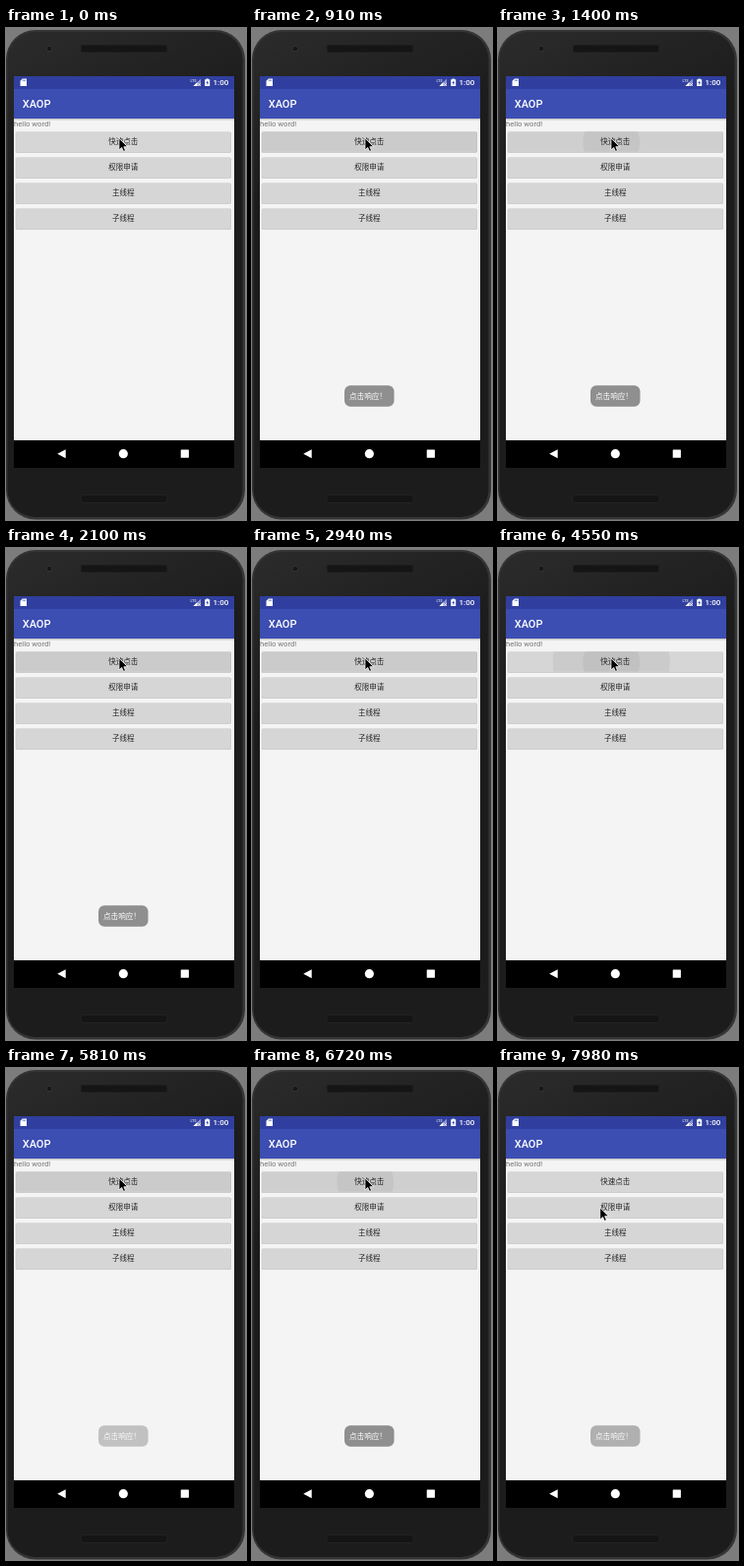
These frames come from a looping animation (244 by 500 pixels, 8 s). An HTML page:

```html
<!DOCTYPE html>
<html lang="zh-CN">
<head>
<meta charset="utf-8">
<title>XAOP</title>
<style>
  html, body { margin: 0; width: 100%; height: 100%; overflow: hidden; background: #7c7c7c; }
  svg { display: block; width: 244px; height: 500px; }
  text { font-family: Roboto, "Noto Sans CJK SC", "Noto Sans CJK", sans-serif; }
  .label { font-size: 7.5px; fill: #222; text-anchor: middle; font-family: "Noto Sans CJK SC", "Noto Sans CJK", sans-serif; }
</style>
</head>
<body>
<svg viewBox="0 0 244 500">
  <defs>
    <linearGradient id="shade" x2="0" y2="1">
      <stop offset="0" stop-color="#000" stop-opacity=".22"/>
      <stop offset="1" stop-color="#000" stop-opacity="0"/>
    </linearGradient>
    <linearGradient id="body" gradientUnits="userSpaceOnUse" x1="0" y1="0" x2="70" y2="150">
      <stop offset="0" stop-color="#2c2c2c"/>
      <stop offset="1" stop-color="#1c1c1c"/>
    </linearGradient>
    <radialGradient id="spot">
      <stop offset="0" stop-color="#999" stop-opacity=".35"/>
      <stop offset="1" stop-color="#aaa" stop-opacity=".15"/>
    </radialGradient>
    <clipPath id="key"><rect x="10" y="105" width="219" height="20.8" rx="1.2"/></clipPath>
  </defs>

  <!-- phone -->
  <rect x="0" y="2" width="243" height="497.5" rx="30" fill="#343434"/>
  <rect x="1.5" y="4" width="239" height="493" rx="28" fill="url(#body)"/>
  <g fill="#151515" stroke="#262626" stroke-width=".8">
    <rect x="76" y="17" width="88" height="8" rx="2"/>
    <rect x="76" y="474.5" width="88" height="8" rx="2"/>
    <circle cx="44" cy="21" r="2.8" stroke="#3a3a3a"/>
  </g>

  <!-- screen -->
  <rect x="8" y="49" width="224" height="398" fill="#f4f4f4"/>
  <rect x="8" y="49" width="224" height="13" fill="#303f9f"/>
  <rect x="8" y="62" width="224" height="30" fill="#3c4eb2"/>
  <rect x="8" y="92" width="224" height="2.5" fill="url(#shade)"/>
  <rect x="8" y="419" width="224" height="28" fill="#000"/>

  <!-- status bar -->
  <g fill="#fff">
    <path d="M16.8 51.5H21V59H14.5V53.8Z"/>
    <path d="M17.2 52.6v1.5m1.3-1.5v1.5m1.3-1.5v1.5" stroke="#303f9f" stroke-width=".6"/>
    <path d="M198 51.5V59H190.5Z" opacity=".45"/>
    <path d="M194.5 55V59H190.5Z"/>
    <text x="187.5" y="55" font-size="4">LTE</text>
    <path d="M195.2 56.2l2.6 2.6m0-2.6l-2.6 2.6" stroke="#fff" stroke-width=".7"/>
    <path d="M203.6 51.5h2.2v.8h1.4V59h-5v-6.7h1.4Z"/>
    <path d="M205.1 53.2l-1.7 2.8h1.1v2l1.6-2.8h-1Z" fill="#303f9f"/>
    <text x="210.5" y="58.2" font-size="8" font-weight="500">1:00</text>
    <text x="16.7" y="81" font-size="11" font-weight="500">XAOP</text>
  </g>
  <text x="8" y="100" font-size="7.7" fill="#777">hello word!</text>

  <!-- navigation -->
  <g fill="#fff">
    <path d="M52.2 432.7L60.7 428.2V437.2Z"/>
    <circle cx="119.3" cy="432.7" r="4.6"/>
    <rect x="177.7" y="428.6" width="8.2" height="8.2" rx=".5"/>
  </g>

  <g id="keys"></g>
  <g id="waves" clip-path="url(#key)"></g>
  <g id="words"></g>

  <g id="toast">
    <rect x="94" y="363.3" width="50.5" height="21.5" rx="6" fill="#8f8f8f"/>
    <text x="99" y="377" class="label" style="fill:#fff;text-anchor:start;font-size:7.6px">点击响应！</text>
  </g>
  <circle id="dot" cx="115" cy="113" r="19" fill="url(#spot)"/>
  <path id="mouse" d="M0 0V12L2.8 9.5L4.6 13.4L6.6 12.5L4.9 8.7H8.8Z" fill="#000" stroke="#fff" stroke-width=".8"/>
</svg>
<script>
  const LOOP = 8000, STEP = 70;
  const $ = id => document.getElementById(id);
  const clamp = x => Math.max(0, Math.min(1, x));
  const add = (parent, tag, attrs) => {
    const el = document.createElementNS('http://www.w3.org/2000/svg', tag);
    for (const k in attrs) el.setAttribute(k, attrs[k]);
    return parent.appendChild(el);
  };

  ['快速点击', '权限申请', '主线程', '子线程'].forEach((label, i) => {
    const y = 105.2 + i * 26;
    add($('keys'), 'rect', { x: 9.8, y: y + .7, width: 219.2, height: 20.9, rx: 1.4, fill: '#c0c0c0' });
    add($('keys'), 'rect', { x: 10.2, y, width: 218.4, height: 20.7, rx: 1.2, fill: '#d6d6d6' });
    add($('words'), 'text', { x: 119.3, y: y + 13.1, class: 'label' }).textContent = label;
  });

  // bursts of taps: first, last
  const taps = [];
  for (const [a, b] of [[350, 1400], [1540, 3430], [3570, 4200], [4480, 4480], [4550, 4550], [4690, 5320], [5460, 6720]])
    for (let t = a; t <= b; t += 210) taps.push(t);

  const LAG = 210;            // delay from tap to ripple
  const radii = [29, 59.5, 125, 125];
  const waves = radii.map(() => add($('waves'), 'circle', { cx: 115.2, cy: 116 }));

  function toastAlpha(t) {
    const show = (a, b) => Math.min(1 - (1 - clamp((t - a) / 420)) ** 1.7, 1 - clamp((t - b) / 420));
    return Math.max(show(490, 2380), show(5670, 7840));
  }

  function draw(time) {
    const t = Math.floor((time % LOOP) / STEP) * STEP;
    waves.forEach((wave, i) => {
      const on = taps.includes(t - i * STEP);
      wave.setAttribute('r', on ? radii[i] : 0);
      wave.setAttribute('opacity', i === 3 ? .03 : .05);
    });
    $('dot').style.opacity = taps.includes(t + LAG) ? 1 : 0;
    $('toast').style.opacity = toastAlpha(t);
    const p = clamp((t - 7000) / 910), e = p * p * (3 - 2 * p);
    $('mouse').setAttribute('transform', `translate(${114.9 - 11.2 * e} ${112 + 30 * e})`);
  }

  let start;
  function tick(now) {
    start ??= now;
    draw(now - start);
    requestAnimationFrame(tick);
  }
  draw(0);
  requestAnimationFrame(tick);
</script>
</body>
</html>
```
